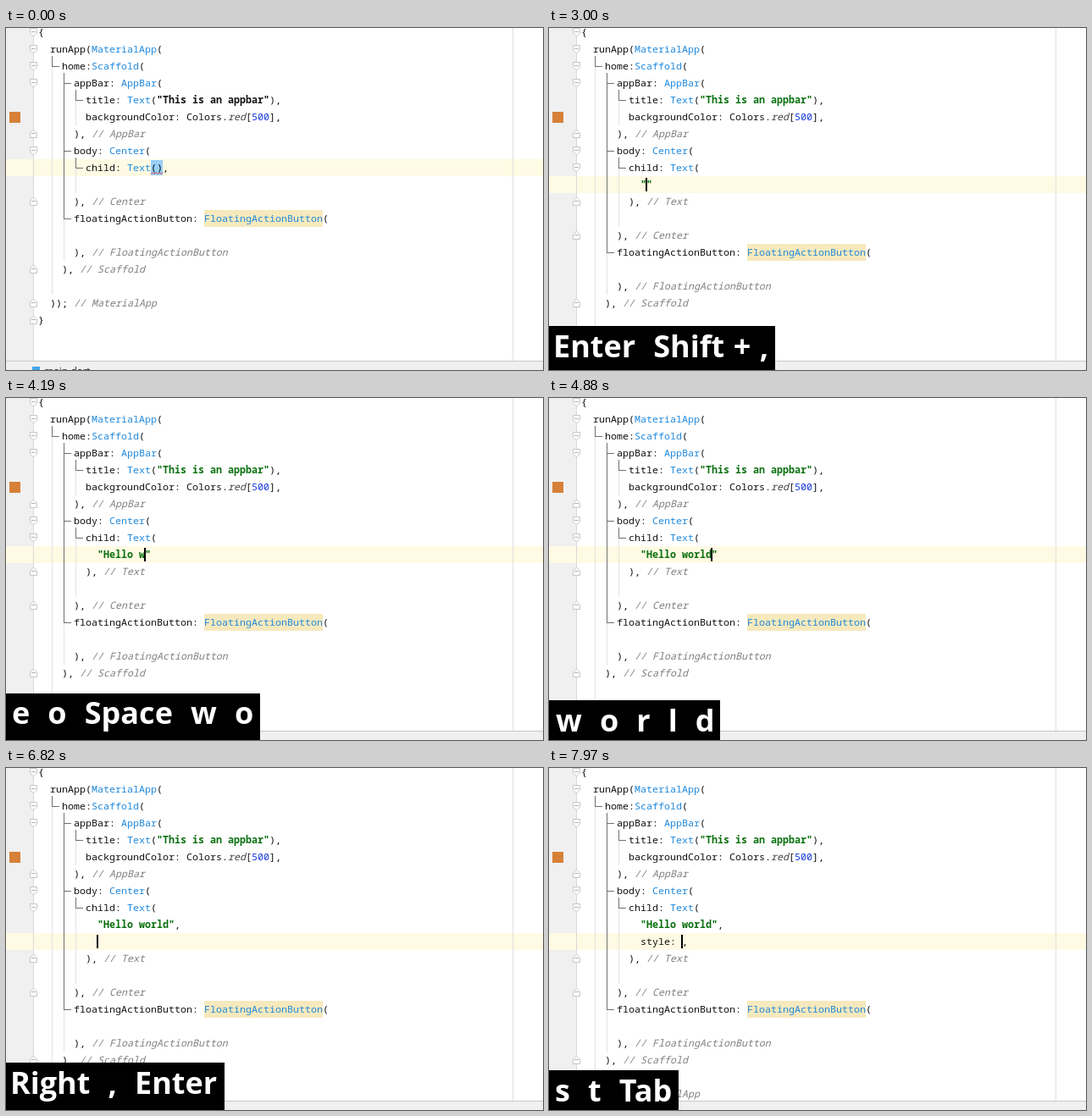
Recreate the animation shown at these times as an HTML page with a canvas. Size 634x404 px, loop 8 s.

```html
<!DOCTYPE html>
<html lang="en">
<head>
<meta charset="utf-8">
<title>Code editor</title>
<style>
html, body { margin: 0; width: 100%; height: 100%; overflow: hidden; background: #fff; }
canvas { display: block; }
</style>
</head>
<body>
<canvas id="stage" width="634" height="404"></canvas>
<script>
const ctx = document.getElementById('stage').getContext('2d');
const LOOP = 8000, ROW = 20, CHAR = 7;
const MONO = '11.667px "Noto Sans Mono", "DejaVu Sans Mono", monospace';
const KEY_FONT = 'bold 36px "Open Sans", "Noto Sans", sans-serif';

// Every pressed key stays in the caption for KEY_LIFE ms.
const KEY_LIFE = 930;
const KEYS = [
  [2380, 'Enter'], [2850, 'Shift + ,'], [3230, 'Shift + h'], [3500, 'e'],
  [3870, 'o'], [3950, 'Space'], [4100, 'w'], [4190, 'o'], [4300, 'r'],
  [4480, 'l'], [4640, 'd'], [5950, 'Right'], [6500, ','], [6820, 'Enter'],
  [7200, 's'], [7430, 't'], [7740, 'Tab']
];

// Each entry holds from its time until the next one.
const GREETING = 'Hello world';
const LETTERS = [
  [3230, 1], [3500, 2], [3700, 3], [3780, 4], [3870, 5], [3950, 6],
  [4100, 7], [4300, 8], [4360, 9], [4540, 10], [4700, 11]
];
const STYLE = [[6820, ''], [7200, 's'], [7430, 'st'], [7740, 'style: ,']];
const BLINK = [[0, false], [70, true], [540, false], [1050, true], [1510, false],
  [1980, true], [5230, false], [5950, true]];
const POINTER = [[70, 440, 312], [780, 172, 158], [1050, 183, 163], [1470, 509, 184]];
const OPTIONS = ['style:', 'strutStyle:', 'semanticsLabel:', 'softWrap:', 'textScaleFactor:', 'textAlign:'];

function at(steps, t) {
  let value;
  for (const [time, v] of steps) if (time <= t) value = v;
  return value;
}

function rect(color, x, y, w, h) {
  ctx.fillStyle = color;
  ctx.fillRect(x, y, w, h);
}

const left = indent => 38 + 14 * indent;
const mid = row => 5 + ROW * row;

function greetingAt(t) {
  if (t < 2850) return '';
  return '"' + GREETING.slice(0, at(LETTERS, t) || 0) + '"' + (t < 6500 ? '' : ',');
}

// Rows are [indent, text, flags]: t = tree branch, o = fold start, c = fold end.
function rowsAt(t) {
  const blank = [0, '', ''];
  const child = [];
  if (t < 2380) {
    child.push([4, 'child: Text(),', 't']);
  } else {
    const parsed = t >= 2680;
    child.push([4, 'child: Text(', parsed ? 'to' : 't'], [5, greetingAt(t), '']);
    if (t >= 6820) child.push([5, at(STYLE, t), '']);
    child.push([4, parsed ? '), // Text' : '),', parsed ? 'c' : '']);
  }
  return [
    [0, '{', 'o'],
    [1, 'runApp(MaterialApp(', 'o'],
    [2, 'home:Scaffold(', 'to'],
    [3, 'appBar: AppBar(', 'to'],
    [4, 'title: Text("This is an appbar"),', 't'],
    [4, 'backgroundColor: Colors.red[500],', ''],
    [3, '), // AppBar', 'c'],
    [3, 'body: Center(', 'to'],
    ...child,
    blank,
    [3, '), // Center', 'c'],
    [3, 'floatingActionButton: FloatingActionButton(', 't'],
    blank,
    [3, '), // FloatingActionButton', ''],
    [2, '), // Scaffold', 'c'],
    blank,
    [1, ')); // MaterialApp', 'c'],
    [0, '}', 'c']
  ];
}

function word(s, x, y, color, style = '') {
  ctx.font = style + ' ' + MONO;
  ctx.fillStyle = color;
  ctx.fillText(s, x, y);
}

function codeLine(s, x, y, stringColor) {
  const tokens = s.match(/\/\/.*|"[^"]*"|\bred\b|[A-Z]\w*|\d+|[a-z]\w*|\s+|[^\w\s"]/g) || [];
  for (const tok of tokens) {
    if (tok.startsWith('//')) word(tok, x, y, '#808080', 'italic');
    else if (tok[0] === '"') word(tok, x, y, stringColor, 'bold');
    else if (tok === 'red') word(tok, x, y, '#444', 'italic');
    else if (/^\d/.test(tok)) word(tok, x, y, '#1238dc');
    else if (/^[A-Z]/.test(tok) && tok !== 'Colors') word(tok, x, y, '#2089dc');
    else word(tok, x, y, '#111');
    x += tok.length * CHAR;
  }
}

function foldMark(y, dir) {
  ctx.beginPath();
  ctx.moveTo(28.5, y - 4.5 * dir);
  ctx.lineTo(36.5, y - 4.5 * dir);
  ctx.lineTo(36.5, y + dir);
  ctx.lineTo(32.5, y + 5 * dir);
  ctx.lineTo(28.5, y + dir);
  ctx.closePath();
  ctx.fillStyle = '#fff';
  ctx.fill();
  ctx.strokeStyle = '#c6c6c6';
  ctx.lineWidth = 1;
  ctx.stroke();
  rect('#b4b4b4', 30, y - 1, 5, 1);
}

function guides(rows) {
  const open = [];
  rows.forEach(([indent, , flags], i) => {
    const x = left(indent) + 2;
    if (flags.includes('o')) open[indent] = i;
    if (flags.includes('c') && indent > 0 && indent < 4) {
      const top = mid(open[indent]) + 10;
      rect('#e2e2e2', x, top, 1, mid(i) - 10 - top);
    }
  });
  rows.forEach(([indent, , flags], i) => {
    if (flags.includes('o')) open[indent] = i;
    if (!flags.includes('t')) return;
    const x = left(indent - 1) + 2, top = mid(open[indent - 1]) + 8;
    rect('#707070', x, top, 1, mid(i) - top);
    rect('#707070', x, mid(i), 9, 1);
  });
}

function bulb(x, y) {
  ctx.fillStyle = '#eaa71b';
  ctx.beginPath();
  ctx.arc(x, y - 4, 5, 0, Math.PI * 2);
  ctx.fill();
  rect('#eaa71b', x - 2, y, 4, 2);
  rect('#666', x - 2, y + 2, 4, 1);
  rect('#666', x - 2, y + 4, 4, 1);
}

function squiggle(x0, x1, y) {
  ctx.strokeStyle = '#e0393e';
  ctx.lineWidth = 1;
  ctx.beginPath();
  for (let x = x0, up = 0; x <= x1; x += 2, up ^= 1) ctx.lineTo(x, y - 2 * up);
  ctx.stroke();
}

function caretAt(t) {
  if (t < 2380) return [8, 178];
  const style = t >= 6820;
  const s = style ? at(STYLE, t) : greetingAt(t);
  const before = style ? s.endsWith(',') : s && t < 5950;
  return [style ? 10 : 9, left(5) + CHAR * (s.length - (before ? 1 : 0))];
}

function pointer(t) {
  if (t < POINTER[0][0] || t >= 1510) return;
  const now = 70 + Math.floor((t - 70) / 80) * 80;
  let i = 0;
  while (i < POINTER.length - 2 && now >= POINTER[i + 1][0]) i++;
  const [t0, x0, y0] = POINTER[i], [t1, x1, y1] = POINTER[i + 1];
  const p = Math.min(1, (now - t0) / (t1 - t0));
  const k = p * p * (3 - 2 * p);
  const x = Math.round(x0 + (x1 - x0) * k), y = Math.round(y0 + (y1 - y0) * k);
  rect('#222', x, y - 7, 1, 15);
  for (const end of [y - 8, y + 8]) {
    rect('#222', x - 3, end, 3, 1);
    rect('#222', x + 1, end, 3, 1);
  }
}

function completion(t) {
  if (t < 7310 || t >= 7740) return;
  const typed = at(STYLE, t), x = 82, y = 216;
  const height = OPTIONS.length * ROW + 8;
  rect('#b5b5b5', x, y, 505, height);
  rect('#ebf4fe', x + 1, y + 1, 503, height - 2);
  rect('#c5dffc', x + 1, y + 1, 503, ROW);
  OPTIONS.forEach((name, i) => {
    const base = y + 15 + i * ROW;
    word(name, left(5), base, '#111');
    if (name.startsWith(typed)) word(typed, left(5), base, '#9c2a9c', 'bold');
  });
}

// The box hugs the ink of the text and sits on the bottom edge.
function caption(t) {
  const text = KEYS.filter(([p]) => p <= t && t < p + KEY_LIFE).map(k => k[1]).join('  ');
  if (!text) return;
  ctx.font = KEY_FONT;
  ctx.wordSpacing = '1.2px';
  const m = ctx.measureText(text);
  const base = Math.round(394 - m.actualBoundingBoxDescent);
  const top = Math.round(base - m.actualBoundingBoxAscent - 10);
  const x = 8 + m.actualBoundingBoxLeft;
  rect('#000', 0, top, Math.round(x + m.actualBoundingBoxRight + 9), 404 - top);
  ctx.fillStyle = '#fff';
  ctx.fillText(text, x, base);
  ctx.wordSpacing = '0px';
}

function statusBar() {
  rect('#f0f0f0', 0, 393, 634, 11);
  rect('#c8c8c8', 0, 393, 634, 1);
  rect('#42a5e8', 31, 400, 9, 4);
  ctx.font = '12px "Open Sans", sans-serif';
  ctx.fillStyle = '#222';
  ctx.fillText('main.dart', 45, 410);
}

function draw(t) {
  const rows = rowsAt(t);
  const [caretRow, caretX] = caretAt(t);
  const caretY = mid(caretRow);

  rect('#fff', 0, 0, 634, 404);
  rect('#f0f0f0', 0, 0, 32, 393);
  rect('#fffae3', 0, caretY - 10, 634, ROW);
  rect('#d9d9d9', 32, 0, 1, 393);
  rect('#e0e0e0', 598, 0, 1, 393);
  rect('#d68038', 4, 99, 13, 13);

  guides(rows);
  if (t < 2380) {
    rect('#99d0f8', 171, 156, 14, 18);
    squiggle(171, 185, 172.5);
  }
  rows.forEach(([indent, text, flags], i) => {
    const x = left(indent), y = mid(i);
    if (flags.includes('o')) foldMark(y, 1);
    if (flags.includes('c')) foldMark(y, -1);
    if (text.startsWith('floating')) rect('#f6e9bd', x + 22 * CHAR, y - 10, 20 * CHAR, ROW);
    codeLine(text, x, y + 4, t < 2380 ? '#111' : '#0a700f');
  });

  if (t >= 5410 && t < 5950) bulb(52, 184);
  if (at(BLINK, t)) rect('#000', caretX - 1, caretY - 8, 2, 16);
  completion(t);
  pointer(t);
  statusBar();
  caption(t);
}

const start = performance.now();
function tick() {
  draw((performance.now() - start) % LOOP);
  requestAnimationFrame(tick);
}
tick();
</script>
</body>
</html>
```
